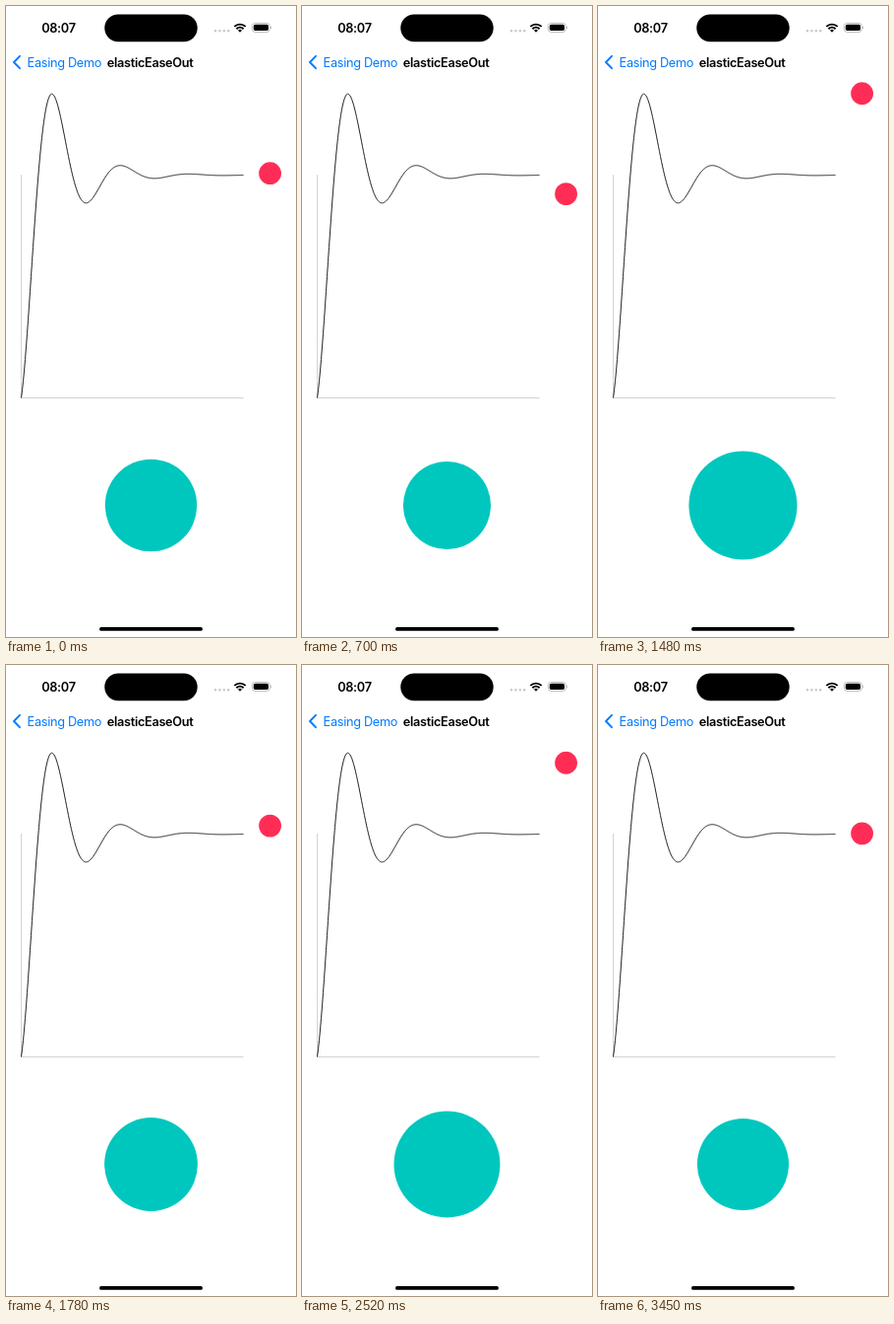
Write an HTML page that moves like this. It is 295 px wide and 640 px high and loops after 3.55 s.

```html
<!DOCTYPE html>
<html lang="en">
<head>
<meta charset="utf-8">
<title>elasticEaseOut</title>
<style>
  html, body { margin: 0; width: 100%; height: 100%; overflow: hidden; background: #fff; }
  svg { display: block; width: 295px; height: 640px; }
  text { font: 12.75px Inter, Roboto, sans-serif; letter-spacing: -.32px; }
  .bold { font-weight: 600; }
</style>
</head>
<body>
<svg viewBox="0 0 295 640" fill="none">
  <!-- status bar -->
  <text class="bold" x="36.2" y="26.5" fill="#000">08:07</text>
  <rect x="100.3" y="8.5" width="94.4" height="27.7" rx="13.85" fill="#000"/>
  <path d="M213 25.2h.01m4.4 0h.01m4.4 0h.01m4.4 0h.01" stroke="#c6c6c6" stroke-width="2.5" stroke-linecap="round"/>
  <g stroke="#000" stroke-width="1.9">
    <path d="M232.3 20.9a8.2 8.2 0 0 1 11.4 0M234.4 23.2a5.2 5.2 0 0 1 7.2 0"/>
    <path d="M236 24.7a2.9 2.9 0 0 1 4 0L238 26.8z" fill="#000" stroke="none"/>
  </g>
  <rect x="250.4" y="17.4" width="17.9" height="9" rx="3" stroke="#aaa" stroke-width=".8"/>
  <rect x="251.8" y="18.7" width="15.2" height="6.4" rx="1.8" fill="#000"/>
  <path d="M269.3 20.4a1.7 1.7 0 0 1 0 3z" fill="#aaa"/>

  <!-- navigation bar -->
  <path d="M14 50.8L8 57l6 6.2" stroke="#007aff" stroke-width="1.9" stroke-linecap="round" stroke-linejoin="round"/>
  <text x="21.6" y="61.6" fill="#007aff">Easing Demo</text>
  <text class="bold" x="102.8" y="61.6" fill="#000">elasticEaseOut</text>

  <!-- graph -->
  <path d="M15.5 171V397.5H241.5" stroke="#c8c8c8" stroke-width=".8"/>
  <path id="curve" stroke="#222" stroke-width="1"/>
  <circle id="ball" cx="268.6" r="11.4" fill="#ff2d55"/>
  <circle id="disc" cx="147.5" cy="506.5" fill="#00c7be"/>

  <rect x="95" y="630" width="105" height="3.8" rx="1.9" fill="#000"/>
</svg>
<script>
const LOOP = 3550, PERIOD = 1060, FIRST_START = 278, SIZE = 226;
const [curve, ball, disc] = ['curve', 'ball', 'disc'].map(id => document.getElementById(id));

const elasticEaseOut = p => 1 - Math.cos(6.5 * Math.PI * p) * 2 ** (-10 * p);

let path = '';
for (let x = 0; x <= SIZE; x++) {
  path += `${x ? 'L' : 'M'}${15.5 + x} ${(397.5 - SIZE * elasticEaseOut(x / SIZE)).toFixed(2)}`;
}
curve.setAttribute('d', path);

// The picture is held between ticks: [count, length in ms]
const runs = [[1, 80], [3, 70], [3, 90], [1, 70], [5, 78], [4, 70], [2, 90], [2, 70],
  [1, 90], [2, 70], [5, 74], [3, 70], [2, 90], [4, 70], [5, 78], [1, 80], [1, 90]];
const ticks = [0];
for (const [count, length] of runs) {
  for (let i = 0; i < count; i++) ticks.push(ticks.at(-1) + length);
}

function draw(now) {
  const time = now % LOOP;
  const tick = ticks.findLast(t => t <= time);
  const cycles = (tick - FIRST_START) / PERIOD;
  const value = elasticEaseOut(cycles - Math.floor(cycles));
  ball.setAttribute('cy', 396.8 - SIZE * value);
  disc.setAttribute('r', 46.6 * (0.5 + 0.5 * value));
}

const start = performance.now();
function frame() {
  draw(performance.now() - start);
  requestAnimationFrame(frame);
}
frame();
</script>
</body>
</html>
```
